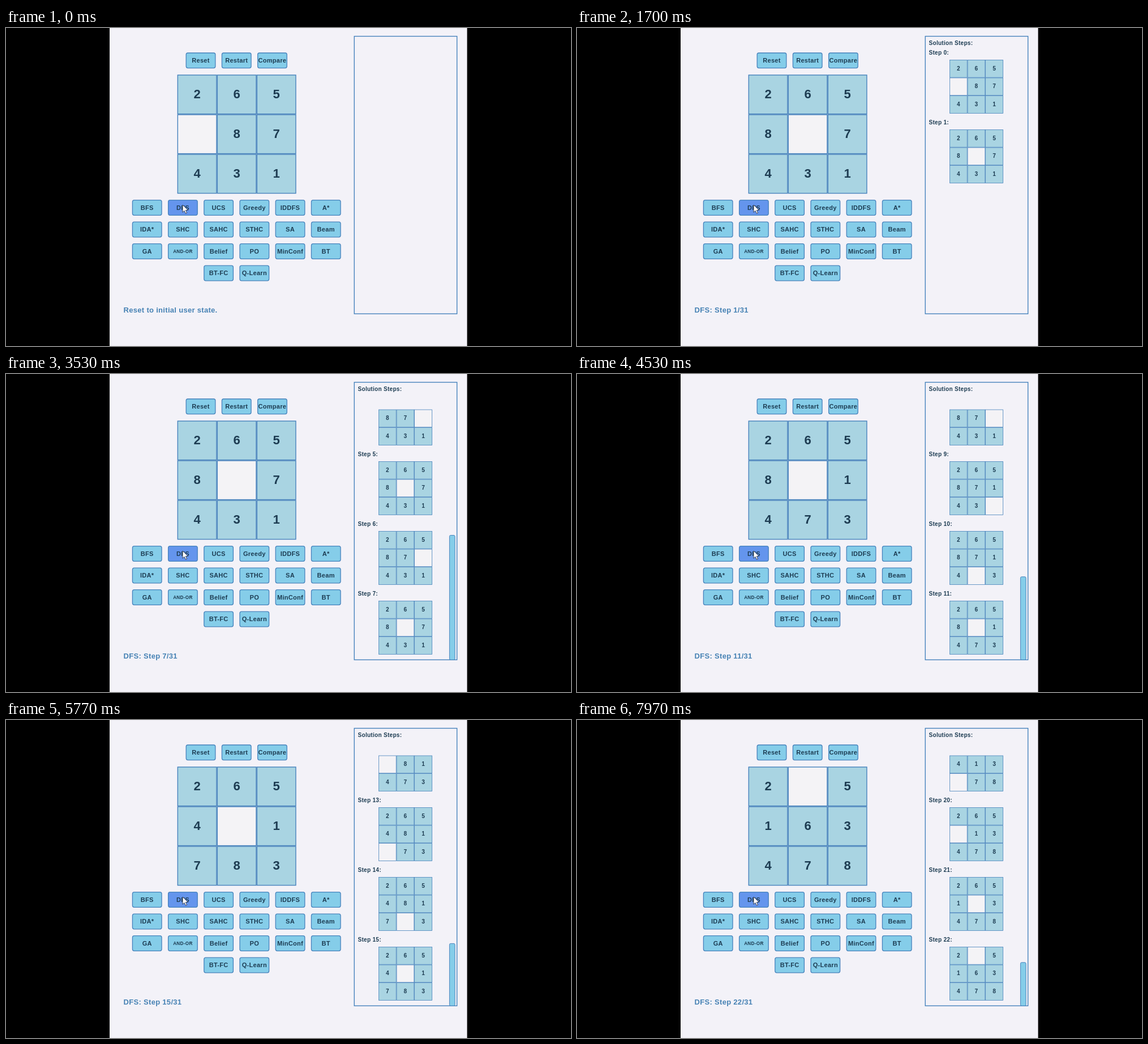
Write an HTML page that moves like this. It is 998 px wide and 561 px high and loops after 8000 ms.

```html
<!DOCTYPE html>
<html lang="en">
<head>
<meta charset="utf-8">
<title>Sliding puzzle solver</title>
<style>
  html, body { margin: 0; width: 100%; height: 100%; overflow: hidden; background: #000; }
  svg { display: block; width: 998px; height: 561px; }
  text { font-family: "Liberation Sans", Arial, sans-serif; font-weight: bold; fill: #1d3c52; }
  .mid { text-anchor: middle; }
  .spaced { letter-spacing: .3px; }
  .line { stroke: #4682bc; }
</style>
</head>
<body>
<svg id="stage" viewBox="0 0 998 561">
  <rect x="183" width="631.5" height="561" fill="#f3f2f8"/>
  <rect class="line" x="615.2" y="14.6" width="181.4" height="489.6" fill="none" stroke-width="1.4"/>
  <g id="buttons"></g>
  <g id="live"></g>
  <path d="M312 312v13.2l3.1-2.8 2.1 4.8 2.3-1-2.1-4.7h4.1z" fill="#fff" stroke="#25324a" stroke-width=".9"/>
</svg>
<script>
const LOOP = 8000, SHOW_AT = 800, STEP_ZERO = 1125, STEP_MS = 307;
const TOTAL = 31, BLOCK = 123;
const START = "265087431";
const BLANK_PATH = "34545454587436745876341";
const COLORS = { tile: "#a9d4e2", blank: "#f4f3f6", button: "#85cde9", hover: "#6495ed" };

const text = (x, y, size, value, cls = "", extra = "") =>
  `<text x="${x}" y="${y}" font-size="${size}" class="${cls}" ${extra}>${value}</text>`;

const box = (x, y, w, h, fill, stroke, radius = 0) =>
  `<rect class="line" x="${x}" y="${y}" width="${w}" height="${h}" rx="${radius}" fill="${fill}" stroke-width="${stroke}"/>`;

function button(label, x, y) {
  const size = label === "AND-OR" ? 8.2 : 11;
  const fill = label === "DFS" ? COLORS.hover : COLORS.button;
  return box(x - 25.8, y - 13.2, 51.6, 26.6, fill, 1.3, 3) +
    text(x, y + size * .36, size, label, "mid spaced");
}

function buttonRow(labels, x, y) {
  return labels.split(" ").map((label, i) => button(label, x + i * 63.2, y)).join("");
}

// Each state swaps the blank with the tile at the next blank position.
const states = [];
let cells = [...START];
for (const next of BLANK_PATH) {
  const blank = cells.indexOf("0");
  cells = [...cells];
  [cells[blank], cells[next]] = [cells[next], cells[blank]];
  states.push(cells);
}

function grid(state, left, top, size, font, stroke, minY = 0) {
  return state.map((value, i) => {
    const x = left + i % 3 * size, y = top + Math.floor(i / 3) * size;
    if (y < minY) return "";
    const tile = box(x + stroke / 2, y + stroke / 2, size - stroke, size - stroke,
      value === "0" ? COLORS.blank : COLORS.tile, stroke);
    const digit = value === "0" ? "" :
      text(x + size / 2, y + size / 2 + font * .3, font, value, "mid");
    return tile + digit;
  }).join("");
}

function history(step) {
  const count = step + 1;
  const scroll = Math.max(0, 56 + BLOCK * step - 400);
  let out = text(621.5, 29.6, 10, "Solution Steps:", "spaced");
  for (let i = Math.max(0, step - 3); i <= step; i++) {
    const top = 56 + BLOCK * i - scroll;
    if (top > 45) out += text(621.5, top - 9.2, 10, `Step ${i}:`, "spaced");
    out += grid(states[i], 658, top, 31.6, 10, .8, 39);
  }
  if (scroll) {
    const height = 1757 / count;
    out += box(783.4, 504.2 - height, 9.6, height, COLORS.button, 1, 2);
  }
  return out;
}

function render(step) {
  const status = step < 0 ? "Reset to initial user state." : `DFS: Step ${step}/${TOTAL}`;
  live.innerHTML = grid(states[Math.max(0, step)], 302.6, 82.3, 70, 22, 1.4) +
    text(207.6, 502, 13, status, "spaced", 'style="fill:#4682b4"') +
    (step < 0 ? "" : history(step));
}

const live = document.getElementById("live");
document.getElementById("buttons").innerHTML =
  buttonRow("Reset Restart Compare", 344, 57.2) +
  buttonRow("BFS DFS UCS Greedy IDDFS A*", 249.2, 316.9) +
  buttonRow("IDA* SHC SAHC STHC SA Beam", 249.2, 355.4) +
  buttonRow("GA AND-OR Belief PO MinConf BT", 249.2, 393.9) +
  buttonRow("BT-FC Q-Learn", 375.6, 432.4);

let shown = null;
const began = performance.now();
function tick() {
  const t = (performance.now() - began) % LOOP;
  const step = t < SHOW_AT ? -1 : Math.max(0, Math.floor((t - STEP_ZERO) / STEP_MS));
  if (step !== shown) render(shown = step);
  requestAnimationFrame(tick);
}
tick();
</script>
</body>
</html>
```
